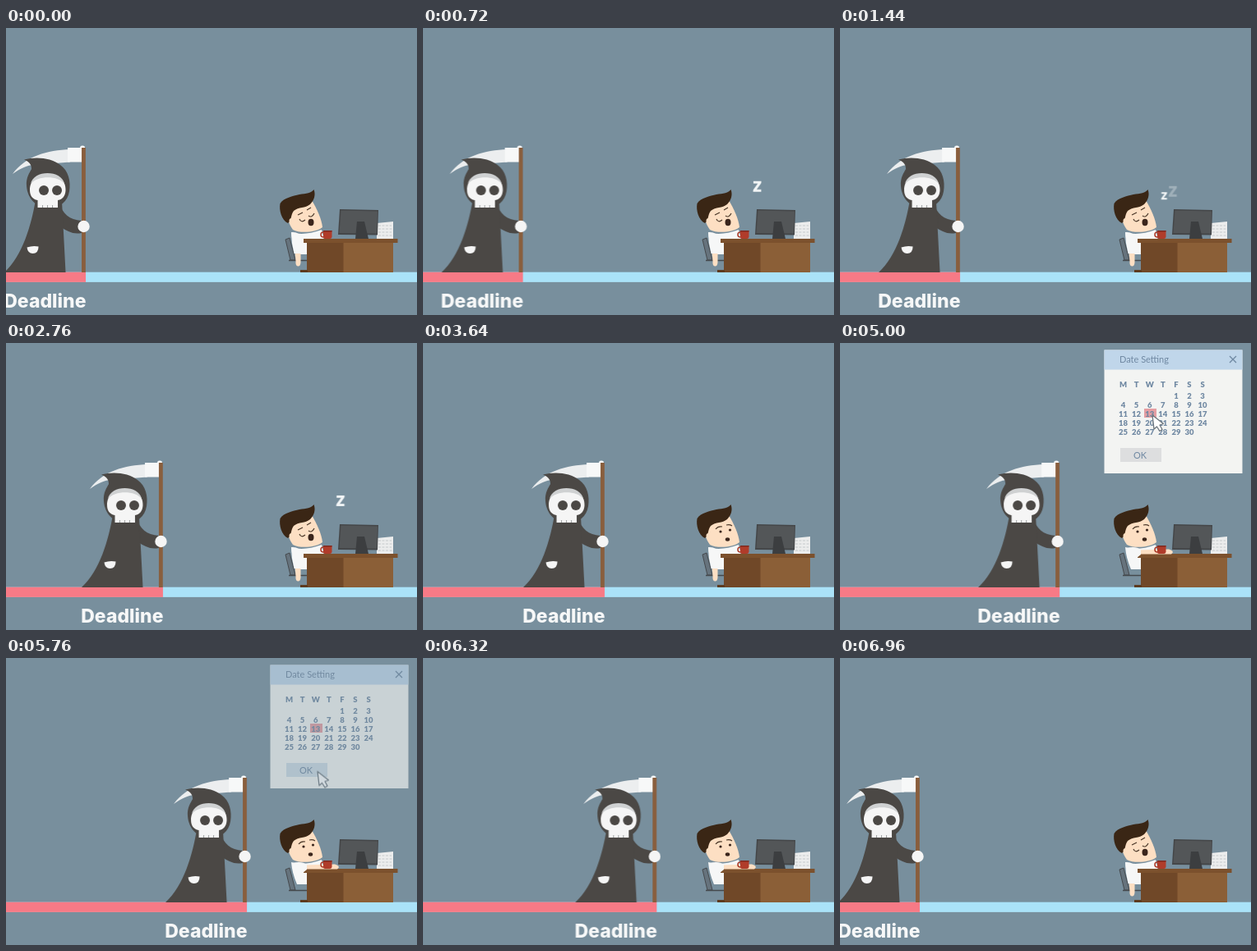
Recreate the animation shown at these times as an HTML page. Size 500 px wide and 350 px high, loop 7 s.

```html
<!DOCTYPE html>
<html lang="en">
<head>
<meta charset="utf-8">
<title>Deadline</title>
<style>
html, body { margin: 0; width: 100%; height: 100%; overflow: hidden; background: #788f9d; }
svg { display: block; width: 100%; height: 100%; }
.reaper, .dialog, .cursor, .asleep, .awake, .arm-down, .arm-up, .snore, .picked, .pressed {
  animation: 7s linear infinite;
}
.reaper { animation-name: walk; }
.dialog { animation-name: dialog; }
.cursor { animation-name: cursor; }
.asleep, .awake, .arm-down, .arm-up, .snore, .picked, .pressed { animation-timing-function: step-end; }
.asleep { animation-name: asleep; }
.awake { animation-name: awake; }
.arm-down { animation-name: arm-down; }
.arm-up { animation-name: arm-up; }
.snore { animation-name: snore; }
.picked { animation-name: picked; }
.pressed { animation-name: pressed; }
.z1, .z2 { animation: z1 1s -.91s linear infinite; }
.z2 { animation-name: z2; }

@keyframes walk {
  0% { transform: translateX(0); }
  88.571% { transform: translateX(211px); animation-timing-function: cubic-bezier(.45, 0, .55, 1); }
  95.714%, 100% { transform: translateX(0); }
}
@keyframes dialog {
  0%, 55.71% { opacity: 0; }
  58.57%, 80.57% { opacity: 1; }
  85.71%, 100% { opacity: 0; }
}
@keyframes cursor {
  0%, 62.1% { transform: translate(480px, 20px); animation-timing-function: ease-in-out; }
  69.2%, 73% { transform: translate(380px, 88px); animation-timing-function: ease-in-out; }
  78%, 100% { transform: translate(379px, 138.5px); }
}
@keyframes asleep { 0% { opacity: 1; } 47.14% { opacity: 0; } 96%, 100% { opacity: 1; } }
@keyframes awake { 0% { opacity: 0; } 47.14% { opacity: 1; } 96%, 100% { opacity: 0; } }
@keyframes arm-down { 0% { opacity: 1; } 57.14% { opacity: 0; } 96%, 100% { opacity: 1; } }
@keyframes arm-up { 0% { opacity: 0; } 57.14% { opacity: 1; } 96%, 100% { opacity: 0; } }
@keyframes snore { 0% { opacity: 0; } 1.286% { opacity: 1; } 44.14%, 100% { opacity: 0; } }
@keyframes picked { 0% { opacity: 0; } 70% { opacity: 1; } 90%, 100% { opacity: 0; } }
@keyframes pressed { 0% { opacity: 0; } 79% { opacity: 1; } 90%, 100% { opacity: 0; } }
@keyframes z1 {
  0%, 12% { opacity: 0; transform: translate(393px, 211px); }
  30% { opacity: 1; }
  45% { opacity: 1; transform: translate(395px, 208.5px); }
  60%, 100% { opacity: 0; transform: translate(396px, 206px); }
}
@keyframes z2 {
  0%, 28% { opacity: 0; transform: translate(404.5px, 207px); }
  50% { opacity: 1; }
  75% { opacity: 1; transform: translate(407.5px, 197px); }
  95%, 100% { opacity: 0; transform: translate(409px, 193px); }
}
.title { font: 800 23px Inter, "Open Sans", sans-serif; fill: #f7f8f8; }
.z1, .z2 { font: 900 17px Lato, sans-serif; fill: #f2f5f6; text-anchor: middle; }
.z2 { font-size: 24px; }
.ui { font: 11px Lato, sans-serif; fill: #6f88a2; }
.days { font: 900 9.5px Lato, sans-serif; fill: #6f88a2; text-anchor: middle; }
</style>
</head>
<body>
<svg viewBox="0 0 500 350" preserveAspectRatio="none">
  <rect width="500" height="350" fill="#788f9d"/>
  <rect y="297.700" width="500" height="12.200" fill="#aae2f8"/>

  <!-- chair and man -->
  <g>
    <path d="M340 258L345 256L352 283H346Z" fill="#66737d" stroke="#45494d"/>
    <path d="M344 283.500H366" stroke="#45494d" stroke-width="1.500"/>
    <path d="M347 249Q362 254 384 246L387 258V276H354Q348 262 347 249Z" fill="#f6f7f7"/>
    <path d="M342 220C352 212 363 207 372 210C378 220 384 233 385 243C378 249 358 251 349 246C344 239 341 230 342 220Z" fill="#fddfc3"/>
    <path d="M343 238C335 234 332 222 333.500 214C338 207 349 205 357 203C365 202 372 201 374.500 197C377 203 375 210 370 215C364 220 356 218 350 223C346 228 348 234 343 238Z" fill="#3a2615"/>
    <circle cx="347.500" cy="235" r="3" fill="#fddfc3"/>
    <g class="asleep" fill="none" stroke="#4b3829" stroke-width="1.2">
      <path d="M357 233Q359 238 364 234M368 229Q372 232 375 226M355 228L361 225M366 222L371 219"/>
      <ellipse cx="371" cy="237" rx="3.500" ry="4.200" fill="#3a251c" stroke="none"/>
    </g>
    <g class="awake" fill="none" stroke="#4b3829" stroke-width="1.2">
      <path d="M356 227Q359 223 364 224M369 222Q373 221 376 223"/>
      <g fill="#3a251c" stroke="none">
        <circle cx="362" cy="230" r="1.6"/>
        <circle cx="373.500" cy="228" r="1.6"/>
        <ellipse cx="370.500" cy="239.500" rx="2.700" ry="2.200"/>
      </g>
    </g>
    <g class="arm-down">
      <path d="M351 268H358.500V286Q358 291 355 290.500Q352 290 352.500 284Z" fill="#fddfc3"/>
      <path d="M347 249Q357 248 361 257L360 275H350.500Q347 262 347 249Z" fill="#f6f7f7"/>
    </g>
  </g>

  <!-- desk -->
  <g>
    <path d="M451 238L471 236V257H451Z" fill="#eceded"/>
    <path d="M453 241H469M453 245H470M453 249H469M453 253H470" stroke="#c5c9cb" stroke-dasharray="3 1.5"/>
    <path d="M406 221L453 222L452 252.500L404 252Z" fill="#444648"/>
    <path d="M407.500 222.500L452 223.500L451 250.500L405.500 250Z" fill="#535658"/>
    <path d="M427 236H436L441 257H425Z" fill="#3c3e40"/>
    <rect x="366" y="261" width="45" height="37" fill="#704828"/>
    <rect x="410.500" y="261" width="60.500" height="37" fill="#8b5f37"/>
    <rect x="358" y="295" width="9" height="3" fill="#5d3b20"/>
    <rect x="362" y="257" width="114.500" height="5" fill="#7c512d"/>
    <g class="arm-up">
      <path d="M362 252.500L400 251.500Q408 254 403 257.500H362Z" fill="#fddfc3"/>
      <path d="M348 250Q360 247 366 252V258L361 262Q350 261 348 250Z" fill="#f6f7f7"/>
    </g>
    <circle cx="386" cy="252" r="3" fill="none" stroke="#a93a28" stroke-width="1.5"/>
    <path d="M386 247H396.500V255Q396 257 394 257H388Q386 257 386 255Z" fill="#b03c2a"/>
    <path d="M386 247H396.500V248.500H386Z" fill="#7d281e"/>
  </g>

  <g class="snore">
    <text class="z1">z</text>
    <text class="z2">z</text>
  </g>

  <g class="reaper">
    <rect x="-400" y="297.700" width="497" height="12.200" fill="#f77a86"/>
    <text class="title" x="97.500" y="341" text-anchor="end">Deadline</text>
    <path d="M78 148C50 149 24 156 8 178C18 171 26 167 34 167L78 163.500Z" fill="#eceeef"/>
    <rect x="75" y="146" width="18" height="17.500" fill="#f7f8f8"/>
    <rect x="90" y="143.500" width="6" height="6" rx="2.500" fill="#f7f8f8"/>
    <rect x="92" y="146" width="4.800" height="152" fill="#895e3d"/>
    <g fill="#4b4845">
      <path d="M64 212C69 227 77 234 92 235V250C82 252 74 248 66 242Z"/>
      <path d="M36 209C31 240 20 278 -2 298H72.500L68 212Z"/>
      <path d="M22 160.500C36 156.500 55 158 66 167C76 174 79 187 77 199C75 212 66 219 51 219C36 219 26 207 25 193C24 182 29 176 31 172C31 166 28 163 22 160.500Z"/>
    </g>
    <path d="M29 198C28 172 74 172 72.500 198C72 205 69 209 63 210V219H38.500V210C32 209 29 204 29 198Z" fill="#f5f5f5"/>
    <path d="M30 190C33 172.500 68 172.500 71 190C64 179.500 38 179.500 30 190Z" fill="#cfd1d2"/>
    <g fill="#4b4845">
      <circle cx="46" cy="198" r="6"/>
      <circle cx="62" cy="198" r="6"/>
    </g>
    <path d="M44.500 216V219M50.500 216V219M56.500 216V219" stroke="#9c9fa0"/>
    <circle cx="94.500" cy="242" r="7.200" fill="#f5f5f5"/>
    <path d="M25.500 267.500Q32.500 265 39.500 266.500Q39.500 275 32.500 275Q26.500 275 25.500 267.500Z" fill="#f5f5f5"/>
  </g>

  <g class="dialog">
    <rect x="321.500" y="8.500" width="168" height="150.500" fill="#f3f4f2"/>
    <rect x="321.500" y="8.500" width="168" height="24" fill="#c0d6ea"/>
    <text class="ui" x="340" y="24">Date Setting</text>
    <path d="M474 16L482 24M482 16L474 24" stroke="#6f88a2" stroke-width="1.300"/>
    <rect class="picked" x="370" y="80" width="15" height="11" fill="#e59ea2"/>
    <g class="days" id="days"></g>
    <rect x="341" y="128" width="50" height="17" fill="#dddedf"/>
    <rect class="pressed" x="341" y="128" width="50" height="17" fill="#cddbe4"/>
    <text class="ui" x="365" y="141" text-anchor="middle">OK</text>
    <path class="cursor" d="M0 0L2 17L5.500 14L9 19.500L12 17.500L9 12L13.500 10.500Z" fill="#fff" stroke="#6d767d" stroke-width="1.300" stroke-linejoin="round"/>
  </g>
</svg>
<script>
const days = document.getElementById("days");

function label(text, col, y) {
  const node = document.createElementNS("http://www.w3.org/2000/svg", "text");
  node.setAttribute("x", 344.5 + col * 16.1);
  node.setAttribute("y", y);
  node.textContent = text;
  days.append(node);
}

[..."MTWTFSS"].forEach((name, col) => label(name, col, 54));
for (let day = 1; day <= 30; day++) {
  const cell = day + 3;
  label(day, cell % 7, 68 + Math.floor(cell / 7) * 10.9);
}
</script>
</body>
</html>
```
